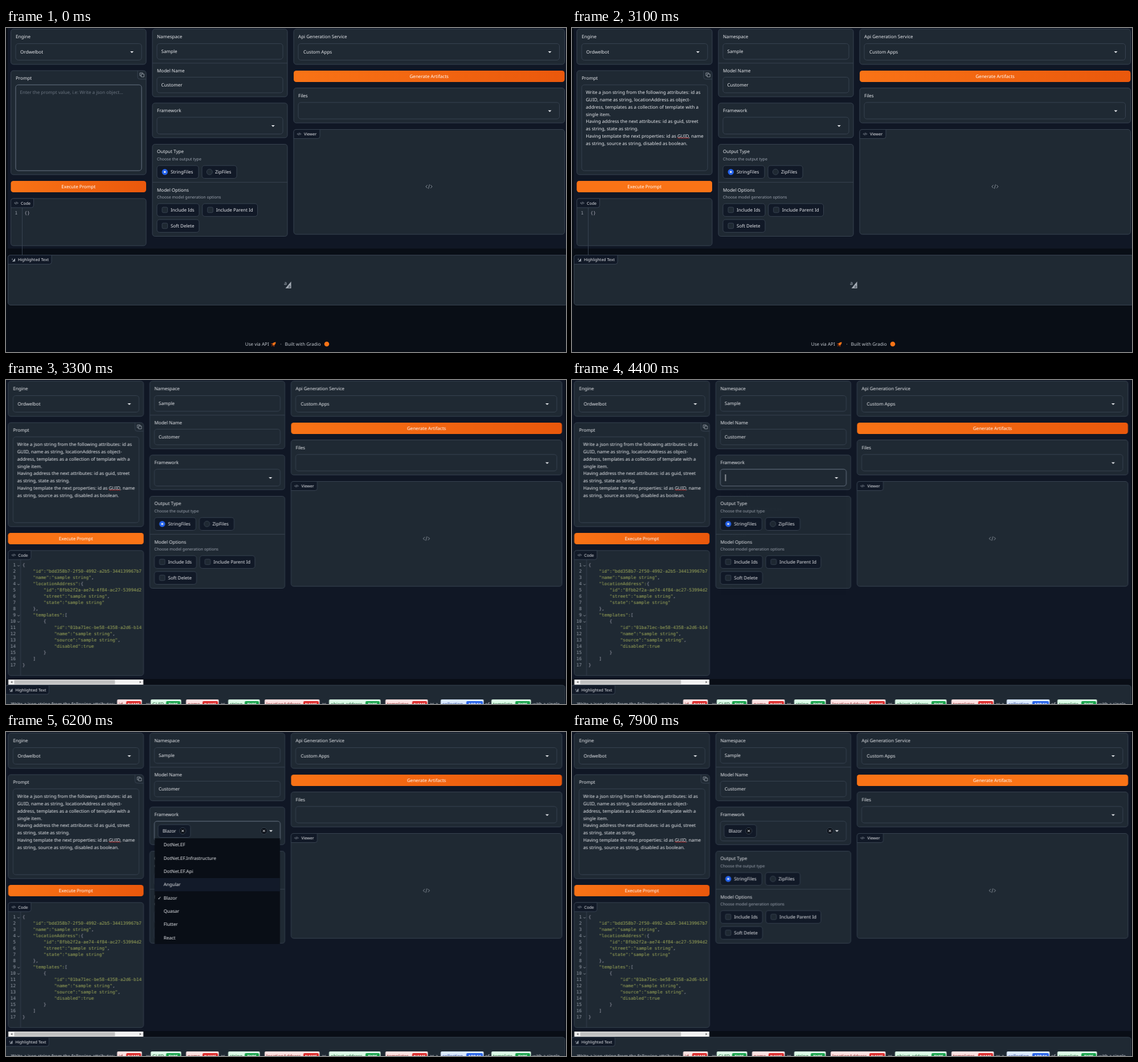
An HTML page for the animation above (8 s loop, 983 px wide and 570 px high).

```html
<!DOCTYPE html>
<html lang="en">
<head>
<meta charset="utf-8">
<title>Artifact generator</title>
<style>
html, body { margin: 0; width: 100%; height: 100%; overflow: hidden; background: #090e16; }
svg { display: block; width: 983px; height: 570px; }
text { font: 8.05px "Noto Sans", "Open Sans", sans-serif; fill: #e7e9ed; text-rendering: geometricPrecision; white-space: pre; }
.small { font-size: 7px; }
.hint { font-size: 7.05px; fill: #9ca3af; }
.mid { font-weight: 500; }
.btn { font-weight: 500; fill: #fff; text-anchor: middle; }
.dim { fill: #69737f; }
.foot { fill: #c3c8cf; }
.mono { font: 7.72px "DejaVu Sans Mono", "Liberation Mono", monospace; }
.num { fill: #9ca3af; text-anchor: end; }
.str { fill: #a2ad5a; }
.brace { fill: #a9a9b8; }
.panel, .field { fill: #1f2933; stroke: #374250; }
.tab, .pill { fill: #111927; stroke: #374250; }
.dark { fill: #090e16; stroke: #374250; }
.bed { fill: #101725; }
.line { stroke: #374250; fill: none; }
.focus { fill: none; stroke: #5d6877; }
.caret { stroke: #f3f4f6; }
.icon { fill: none; stroke: #a4abb5; stroke-width: .8; }
.solid { fill: #e7e9ed; }
.hot { fill: #f97316; }

/* One loop is 8 s, so 1% is 80 ms. */
[class*="k-"] { animation: 8s step-end infinite; }
.k-shift { animation-name: shift; }
.k-hint { animation-name: hint; }
.k-caret1 { animation-name: caret1; }
.k-prompt { animation-name: prompt; }
.k-caret2 { animation-name: caret2; }
.k-area { animation-name: area; }
.k-spell { animation-name: spell; }
.k-run { animation-name: run; }
.k-load { animation-name: load; }
.k-before { animation-name: before; }
.k-after { animation-name: after; }
.k-field { animation-name: field; }
.k-caret3 { animation-name: caret3; }
.k-list { animation-name: list; }
.k-row { animation-name: row; }
.k-empty { animation-name: empty; }
.k-picked { animation-name: picked; }
.k-caret4 { animation-name: caret4; }
.k-drop { animation-name: drop; }
.k-gen { animation-name: gen; }

@keyframes shift { 0% { transform: none } 40.625%, 100% { transform: translate(-4.6px, 0) } }
@keyframes hint { 0% { opacity: 1 } 25%, 100% { opacity: 0 } }
@keyframes caret1 { 0%, 12.5% { opacity: 0 } 5%, 20% { opacity: 1 } 25%, 100% { opacity: 0 } }
@keyframes prompt { 0% { opacity: 0 } 25%, 100% { opacity: 1 } }
@keyframes caret2 { 0% { opacity: 0 } 25% { opacity: 1 } 32.5%, 100% { opacity: 0 } }
@keyframes area { 0% { opacity: 1 } 36.25% { opacity: 1; animation-timing-function: ease } 38.125%, 100% { opacity: 0 } }
@keyframes spell { 0% { opacity: 0 } 36.25%, 100% { opacity: 1 } }
@keyframes run { 0% { opacity: 0 } 30.625% { opacity: 1 } 46.25%, 100% { opacity: 0 } }
@keyframes load { 0% { opacity: 0 } 39.375% { opacity: 1 } 40.625%, 100% { opacity: 0 } }
@keyframes before { 0% { opacity: 1 } 40.625%, 100% { opacity: 0 } }
@keyframes after { 0% { opacity: 0 } 40.625%, 100% { opacity: 1 } }
@keyframes field { 0% { opacity: 0 } 55% { opacity: 1 } 92.5%, 100% { opacity: 0 } }
@keyframes caret3 { 0%, 62.5% { opacity: 0 } 55%, 70% { opacity: 1 } 72.5%, 100% { opacity: 0 } }
@keyframes list {
  0% { opacity: 0; transform: translate(0, 5px) }
  55% { opacity: 0; transform: translate(0, 5px); animation-timing-function: cubic-bezier(.215, .61, .355, 1) }
  57.5% { opacity: 1; transform: none }
  92.5% { opacity: 1; transform: none; animation-timing-function: cubic-bezier(.55, .055, .675, .19) }
  95%, 100% { opacity: 0; transform: translate(0, 5px) }
}
@keyframes row {
  0% { opacity: 0; transform: none }
  61.25%, 80% { opacity: 1; transform: none }
  61.875%, 79.375% { opacity: 1; transform: translate(0, 23.33px) }
  63.125%, 78.75% { opacity: 1; transform: translate(0, 46.66px) }
  63.75%, 77.5% { opacity: 1; transform: translate(0, 70px) }
  68.125% { opacity: 1; transform: translate(0, 93.3px) }
  81.25%, 100% { opacity: 0; transform: none }
}
@keyframes empty { 0% { opacity: 1 } 72.5%, 100% { opacity: 0 } }
@keyframes picked { 0% { opacity: 0 } 72.5%, 100% { opacity: 1 } }
@keyframes caret4 { 0%, 77.5% { opacity: 0 } 72.5%, 85% { opacity: 1 } 92.5%, 100% { opacity: 0 } }
@keyframes drop { 0% { transform: none } 72.5%, 100% { transform: translate(0, 5.2px) } }
@keyframes gen { 0% { opacity: 0 } 98.75%, 100% { opacity: 1 } }
</style>
</head>
<body>
<svg id="stage" viewBox="0 0 983 570" xmlns="http://www.w3.org/2000/svg"></svg>
<script>
const text = (x, y, s, cls = '') => `<text x="${x}" y="${y}" class="${cls}">${s}</text>`;
const box = (x, y, x2, y2, cls = 'panel', r = 4.5) =>
  `<rect x="${x}" y="${y}" width="${x2 - x}" height="${y2 - y}" rx="${r}" class="${cls}"/>`;
const path = (d, cls) => `<path d="${d}" class="${cls}"/>`;
const dot = (x, y, r, cls) => `<circle cx="${x}" cy="${y}" r="${r}" class="${cls}"/>`;
const group = (cls, ...parts) => `<g class="${cls}">${parts.join('')}</g>`;

const arrow = (x, y) => path(`M${x - 3} ${y - 1.5}h6l-3 3z`, 'solid');
const caret = (x, y, cls) => path(`M${x} ${y}v12`, 'caret ' + cls);
const tab = (x, y, x2, h = 16) =>
  path(`M${x} ${y + h}V${y + 4}q0-4 4-4H${x2}V${y + h - 4}q0 4-4 4z`, 'tab');
const codeIcon = (x, y, k) =>
  path(`M${x - 2 * k} ${y - 2 * k}l${-2 * k} ${2 * k}l${2 * k} ${2 * k}M${x + 2 * k} ${y - 2 * k}l${2 * k} ${2 * k}l${-2 * k} ${2 * k}M${x + .7 * k} ${y - 2.7 * k}l${-1.4 * k} ${5.4 * k}`, 'icon');
const markIcon = (x, y, k) =>
  `<g transform="translate(${x} ${y}) scale(${k})"><path d="M-4 6L6-6V6z" fill="#a4abb5"/>` +
  `<text x="-6.5" y="0" style="font-size:9px;fill:#a4abb5">a</text>` +
  `<text x="1" y="5" style="font-size:7px;fill:#1f2933">a</text></g>`;
const cross = (x, y) => dot(x, y, 5.6, 'dark') +
  path(`M${x - 2} ${y - 2}l4 4m0-4l-4 4`, 'caret');
const button = (x, y, x2, y2, label, hover) =>
  box(x, y, x2, y2, 'warm') + box(x, y, x2, y2, 'hot ' + hover) +
  text((x + x2) / 2, y + 13, label, 'btn');
const check = (x, y, x2, label) => box(x, y, x2, y + 22.4, 'pill') +
  box(x + 9, y + 6.2, x + 18.6, y + 15.8, 'field', 2) + text(x + 24, y + 14, label, 'mid');

const engine = box(8.5, 2, 246, 64) + text(17, 18.3, 'Engine') +
  box(17, 27.5, 238, 56.5, 'field') + text(25, 45, 'Ordwelbot') + arrow(221, 42.5);

const lines = [
  'Write a json string from the following attributes: id as',
  'GUID, name as string, locationAddress as object-',
  'address, templates as a collection of template with a',
  'single item.',
  'Having address the next attributes: id as guid, street',
  'as string, state as string.',
  'Having template the next properties: id as GUID, name',
  'as string, source as string, disabled as boolean.'];
const wave = 'M185 193.6' + 'q1-1.4 2 0t2 0'.repeat(5);
const prompt = box(8.5, 75, 246, 258) + text(17, 91, 'Prompt') +
  path('M231 75v11q0 4 4 4h11', 'line') +
  path('M237.3 81h5v5h-5zM240 81v-2h-5v5h2.3', 'icon') +
  box(17, 100, 238, 251, 'field') + box(17, 100, 238, 251, 'focus k-area') +
  text(24.5, 116.2, 'Enter the prompt value, i.e: Write a json object...', 'dim k-hint') +
  caret(24.5, 108, 'k-caret1') +
  group('k-prompt', ...lines.map((s, i) => text(24.2, 116.2 + i * 12.8, s))) +
  `<path d="${wave}" class="k-spell" fill="none" stroke="#e02b2b" stroke-width=".8"/>` +
  caret(202.5, 197, 'k-caret2') +
  button(8.5, 269, 246, 289, 'Execute Prompt', 'k-run');

const codeTab = tab(8.5, 300, 48.5) + codeIcon(18, 308, .8) + text(26, 310.6, 'Code', 'small');
const codeBefore = box(8.5, 300, 246, 383) + path('M28.5 316V399', 'line') + codeTab +
  text(20.2, 328.4, '1', 'mono num') + text(32.6, 328.4, '{}', 'mono brace');

const code = `{
    "id":"bdd358b7-2f50-4992-a2b5-344139967b7
    "name":"sample string",
    "locationAddress":{
        "id":"8fbb2f2a-ae74-4f84-ac27-53994d2
        "street":"sample string",
        "state":"sample string"
    },
    "templates":[
        {
            "id":"01ba71ec-be58-4358-a2d6-b14
            "name":"sample string",
            "source":"sample string",
            "disabled":true
        }
    ]
}`.split('\n');
const codeRow = (s, i) => {
  const y = 328.4 + i * 10.97, body = s.trim();
  const x = 33.4 + (s.length - body.length) * 4.648;
  const styled = body.replace(/[{}\[\]]|,$/g, c => `<tspan class="brace">${c}</tspan>`);
  const fold = [0, 3, 8, 9].includes(i) ? path(`M24.8 ${y - 2.5}l1.8 1.8l1.8-1.8`, 'icon') : '';
  return text(21.6, y, i + 1, 'mono num') + fold + text(x, y, styled, 'mono str');
};
const codeAfter = box(8.5, 300, 246, 520) + path('M30.1 316V520', 'line') + codeTab +
  `<g clip-path="url(#pane)">${code.map(codeRow).join('')}</g>` +
  '<path d="M8.6 527h237v9h-237z" fill="#f1f1f1"/><path d="M19 527.8h176.8v7.4H19z" fill="#c1c1c1"/>' +
  '<path d="M15.6 529.5v4l-2.4-2zM239.4 529.5v4l2.4-2z" fill="#4a4a4a"/>';

const model = box(257, 2, 494, 121) + path('M257 61.8H494', 'line') +
  text(265, 18.3, 'Namespace') + box(265, 27.5, 486, 55, 'field') + text(272.5, 43.8, 'Sample') +
  text(265, 77.5, 'Model Name') + box(265, 86.5, 486, 114, 'field') + text(272.5, 102.6, 'Customer');

const framework =
  group('k-empty', box(257, 132, 494, 193), box(265, 157, 486, 186.5, 'field'),
    box(265, 157, 486, 186.5, 'focus k-field'), arrow(468.8, 172.5), caret(274, 166, 'k-caret3')) +
  group('k-picked', box(257, 132, 494, 198.2), box(265, 157, 486, 191.7, 'field'),
    box(265, 157, 486, 191.7, 'focus k-field'), box(271.6, 163, 328.4, 185.5, 'pill'),
    text(279.4, 177, 'Blazor', 'mid'), cross(314.8, 174), cross(457.4, 174), arrow(469.6, 174.3),
    caret(337.2, 168, 'k-caret4')) +
  text(265, 147.6, 'Framework');

const output = group('k-drop', box(257, 204.5, 494, 366.5), path('M257 271.4H494', 'line'),
  text(265, 220.2, 'Output Type'), text(265, 233.2, 'Choose the output type', 'hint'),
  box(265, 242, 338, 264.5, 'pill'), '<circle cx="278.8" cy="253.2" r="5.2" fill="#2563eb"/>',
  dot(278.8, 253.2, 1.8, 'solid'), text(289, 256.2, 'StringFiles', 'mid'),
  box(344, 242, 405, 264.5, 'pill'), dot(357.3, 253.2, 5, 'field'), text(367, 256.2, 'ZipFiles', 'mid'),
  text(265, 287.6, 'Model Options'), text(265, 300, 'Choose model generation options', 'hint'),
  check(265, 309, 339, 'Include Ids'), check(344.7, 309, 441.5, 'Include Parent Id'),
  check(265, 337, 339, 'Soft Delete'));

const options = ['DotNet.EF', 'DotNet.EF.Infrastructure', 'DotNet.EF.Api', 'Angular',
  'Blazor', 'Quasar', 'Flutter', 'React'];
const list = group('k-list',
  '<path d="M265.6 187h220v186h-220z" fill="#090e16"/>',
  '<path d="M265.6 187h220v23.3h-220z" fill="#121a29" class="k-row"/>',
  ...options.map((s, i) => text(281.2, 201.4 + i * 23.33, s)),
  text(270.8, 294.8, '✓', 'k-picked'));

const service = box(505, 2, 980.5, 64) + text(513, 18.3, 'Api Generation Service') +
  box(513, 27.5, 971.5, 56.5, 'field') + text(522, 45, 'Custom Apps') + arrow(954.5, 42.5) +
  button(505, 75, 980.5, 95, 'Generate Artifacts', 'k-gen') +
  box(505, 105.5, 980.5, 167) + text(513, 121.6, 'Files') +
  box(513, 131, 971.5, 160, 'field') + arrow(954.5, 146.3) +
  box(505, 178.5, 980.5, 363) + tab(505, 178.5, 551) + codeIcon(514.5, 186.5, .8) +
  text(523, 189, 'Viewer', 'small') + codeIcon(742.5, 279, 1.4);

const markTab = y => tab(3.5, y, 80) + markIcon(13, y + 8.5, .5) +
  text(21, y + 10.7, 'Highlighted Text', 'small');
const rocket = '<g transform="translate(470 556) rotate(45)" fill="#f97316">' +
  '<path d="M0-5Q3-2 1.8 2H-1.8Q-3-2 0-5z"/><path d="M-2 0l-2 3h2zM2 0l2 3h-2zM-1 3h2l-1 3z" fill="#c2410c"/></g>';
const lower = box(3.5, 399.5, 986, 487.5) + markTab(399.5) + markIcon(494.5, 452, 1) +
  text(419.8, 558.7, 'Use via API', 'foot') + rocket + text(481.5, 558.7, '·', 'foot') +
  text(489.5, 558.7, 'Built with Gradio', 'foot') + dot(563, 556, 4.3, 'hot');

const loading = (x, y, x2, y2, cx, cy, end) => box(x, y, x2, y2, 'dark') + dot(cx, cy, 4.3, 'hot') +
  `<text x="${end}" y="${y + 11}" class="mono" text-anchor="end">0.0s</text>`;

const kinds = {
  NAME: ['#fee2e2', '#dc2626', '#7f1d1d'],
  TYPE: ['#dcfce7', '#16a34a', '#14532d'],
  ARRAY: ['#dbeafe', '#2563eb', '#1e3a8a']
};
// chip start, badge start, badge end, word, kind
const chips = [
  [195, 211, 237, 'id', 'NAME'], [254, 281, 306, 'GUID', 'TYPE'], [316, 345, 372, 'name', 'NAME'],
  [390, 419, 444, 'string', 'TYPE'], [454, 522, 549, 'locationAddress', 'NAME'],
  [567, 631, 656, 'object-address', 'TYPE'], [666, 713, 739, 'templates', 'NAME'],
  [763, 808, 837, 'collection', 'ARRAY'], [852, 894, 920, 'template', 'TYPE']];
const chip = ([x, bx, end, word, kind]) => {
  const [pale, strong, ink] = kinds[kind];
  return `<rect x="${x}" y="562" width="${end - x + 1.5}" height="16" rx="2" fill="${pale}"/>` +
    `<rect x="${bx}" y="565" width="${end - bx}" height="11" rx="2" fill="${strong}"/>` +
    `<text x="${x + 3}" y="573" style="fill:${ink}">${word}</text>` +
    `<text x="${(bx + end) / 2}" y="572.8" text-anchor="middle" style="font-size:7px;font-weight:700;fill:#fff">${kind}</text>`;
};
const plain = [[9, 'Write a json string from the following attributes:'], [245, 'as'], [376.5, 'as'],
  [554, 'as'], [743.5, 'as a'], [841, 'of'], [924.5, 'with a single']];
const marked = box(3.5, 537, 986, 600) + markTab(537) +
  `<g transform="translate(4.6 0)">${plain.map(([x, s]) => text(x, 573, s)).join('')}${chips.map(chip).join('')}</g>`;

const defs = `<defs>
  <linearGradient id="warm"><stop stop-color="#f97316"/><stop offset="1" stop-color="#ea580c"/></linearGradient>
  <clipPath id="pane"><path d="M9 317H245.6V520H9z"/></clipPath>
</defs><style>.warm { fill: url(#warm) }</style>`;

document.getElementById('stage').innerHTML = defs + group('k-shift',
  group('k-before', box(3, -10, 986, 388, 'bed', 0), lower, codeBefore),
  group('k-after', box(3, -10, 986, 526, 'bed', 0), codeAfter, marked),
  group('k-load', loading(8.5, 300, 246, 383, 126.5, 340.5, 240.5),
    loading(3.5, 399.5, 986, 487.5, 493.5, 442.5, 979.5)),
  engine, prompt, model, framework, output, service, list);
</script>
</body>
</html>
```
